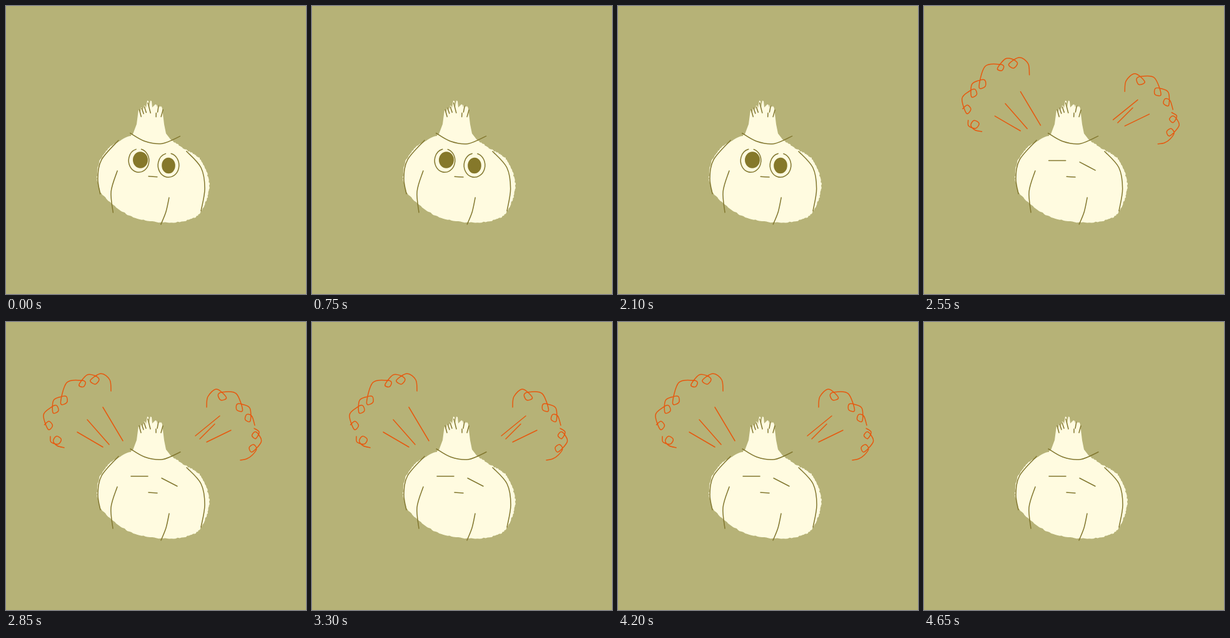
Write an HTML page with a canvas that moves like this. It is 480 px wide and 463 px high and loops after 4.8 s.

```html
<!DOCTYPE html>
<html lang="en">
<head>
<meta charset="utf-8">
<title>Garlic</title>
<style>
html, body { margin: 0; width: 100%; height: 100%; overflow: hidden; background: #b6b277; }
canvas { display: block; }
</style>
</head>
<body>
<canvas id="stage" width="480" height="463"></canvas>
<script>
const ctx = document.getElementById('stage').getContext('2d');
const STEP = 150, LOOP = 4800;
const BG = '#b6b277', SKIN = '#fffbe0', INK = '#82772f', PUPIL = '#85782a', STEAM = '#e6590f';

const bulb = [264,215, 288,231, 311,247, 325,283, 320,314, 300,341, 250,348, 195,336, 152,299, 147,259, 166,227, 203,206];
const tufts = [213,167, 217,163, 222,160, 227,152, 232,152, 240,158, 244,159, 248,161];
const folds = [
  [199,204, 222,217, 250,221, 279,209],
  [180,216, 153,247, 147,277, 151,302],
  [178,265, 168,298, 171,332],
  [289,234, 312,260, 318,294, 312,330],
  [261,308, 256,331, 248,351],
  [228,274, 242,275]
];
const fibres = [
  [213,167, 216,178], [217,164, 220,173], [221,162, 224,171], [227,156, 231,172],
  [240,172, 240,178], [244,160, 242,171], [251,167, 248,178]
];
const lids = [[200,248, 227,248], [249,251, 274,264]];
const rays = [
  [155,137, 187,191], [130,157, 165,197], [114,177, 155,201],
  [342,151, 303,183], [334,164, 310,188], [360,174, 321,193]
];

function random(seed) {
  return () => (seed = (seed * 16807) % 2147483647) / 2147483647;
}

function pairs(flat) {
  const pts = [];
  for (let i = 0; i < flat.length; i += 2) pts.push([flat[i], flat[i + 1]]);
  return pts;
}

// Looping line around a hub: each loop is [x, y, radius], dir is the way round
function curl(hub, dir, head, loops, tail) {
  const out = (x, y) => {
    const dx = x - hub[0], dy = y - hub[1], len = Math.hypot(dx, dy);
    return [dx / len, dy / len];
  };
  const pts = [...head];
  loops.forEach(([x, y, r], i) => {
    const [nx, ny] = out(x, y), a = Math.atan2(ny, nx);
    for (let k = 1; k <= 4; k++) {
      const turn = a + dir * k * Math.PI / 2;
      pts.push(x + r * Math.cos(turn), y + r * Math.sin(turn));
    }
    const next = loops[i + 1];
    if (!next) return;
    const mx = (x + next[0]) / 2, my = (y + next[1]) / 2, [ux, uy] = out(mx, my);
    const rise = 4 + 0.34 * Math.hypot(next[0] - x, next[1] - y);
    pts.push(mx + ux * rise, my + uy * rise);
  });
  return [...pts, ...tail];
}

const left = [150, 175], right = [320, 190];
const curls = [
  curl(left, -1, [168,111, 166,93, 152,83], [[142,93,7], [122,99,5.5], [92,125,7], [78,140,6.5], [68,166,6.5]], []),
  curl(left, -1, [71,184, 72,193], [[82,190,6.5]], [82,199, 93,202]),
  curl(right, 1, [321,137, 323,120, 337,108], [[346,119,7], [374,137,6.5], [388,154,6]], [398,166]),
  curl(right, 1, [397,171, 405,177], [[399,182,5.5], [395,203,6]], [394,214, 385,220, 375,222])
];

// Catmull-Rom curve as bezier segments
function curve(path, pts) {
  path.moveTo(...pts[0]);
  for (let i = 0; i < pts.length - 1; i++) {
    const b = pts[i], c = pts[i + 1], a = pts[i - 1] || b, d = pts[i + 2] || c;
    path.bezierCurveTo(b[0] + (c[0] - a[0]) / 6, b[1] + (c[1] - a[1]) / 6,
      c[0] - (d[0] - b[0]) / 6, c[1] - (d[1] - b[1]) / 6, c[0], c[1]);
  }
}

// Smooth bulb with a dry-brush edge, joined to the frayed stalk
function makeBody() {
  const path = new Path2D(), rnd = random(77), pts = pairs(bulb);
  path.moveTo(203, 206);
  path.lineTo(209, 190);
  for (const [x, y] of pairs(tufts)) {
    path.lineTo(x - 1, y);
    path.lineTo(x + 1, y + 1);
    path.lineTo(x + 2, Math.max(y + 4, 163));
  }
  path.lineTo(253, 190);
  path.lineTo(256, 205);
  const mix = (a, b, c, d, t) => 0.5 * (2 * b + (c - a) * t +
    (2 * a - 5 * b + 4 * c - d) * t * t + (3 * b - a - 3 * c + d) * t * t * t);
  for (let i = 0; i < pts.length - 1; i++) {
    const b = pts[i], c = pts[i + 1], a = pts[i - 1] || b, d = pts[i + 2] || c;
    for (let t = 0; t < 1; t += 0.06) {
      path.lineTo(mix(a[0], b[0], c[0], d[0], t) + (rnd() - 0.5) * 1.7,
        mix(a[1], b[1], c[1], d[1], t) + (rnd() - 0.5) * 1.7);
    }
  }
  path.closePath();
  return path;
}

function sketch(lines, phase, shake) {
  const path = new Path2D(), rnd = random(311 + phase * 977);
  const jog = size => (rnd() - 0.5) * size;
  for (const line of lines) {
    const dx = jog(shake), dy = jog(shake);
    curve(path, pairs(line).map(([x, y]) => [x + dx + jog(shake / 2), y + dy + jog(shake / 2)]));
  }
  return path;
}

const body = makeBody();
const poses = [0, 1, 2].map(phase => {
  const shake = phase === 1 ? 0 : 0.8;
  return {
    lines: sketch([...folds, ...fibres], phase, shake),
    lids: sketch(lids, phase, shake),
    steam: sketch([...rays, ...curls], phase, shake * 1.5)
  };
});

function stroke(path, color) {
  ctx.strokeStyle = color;
  ctx.lineWidth = 1.5;
  ctx.stroke(path);
}

function eye(x, y, rx, ry, px, py, prx, pry, phase) {
  const ring = new Path2D(), pupil = new Path2D(), tilt = (phase - 1) * 0.02;
  ring.ellipse(x, y, rx, ry, tilt, -1.3, Math.PI * 1.5 - 0.25);
  pupil.ellipse(px, py, prx, pry, tilt, 0, Math.PI * 2);
  stroke(ring, INK);
  ctx.fillStyle = PUPIL;
  ctx.fill(pupil);
}

const within = (t, from, to) => t >= from && t < to;

function draw(time) {
  const t = Math.floor((time % LOOP) / STEP) * STEP;
  const phase = (t / STEP) % 3, pose = poses[phase];
  const closed = within(t, 1200, 1500) || t >= 2250;

  ctx.fillStyle = BG;
  ctx.fillRect(0, 0, 480, 463);
  ctx.lineCap = ctx.lineJoin = 'round';
  ctx.fillStyle = SKIN;
  ctx.fill(body);
  stroke(pose.lines, INK);
  if (closed) {
    stroke(pose.lids, INK);
  } else {
    eye(212.5, 248.5, 16.3, 18.8, 215, 247.5, 12, 13.3, phase);
    eye(260, 256, 16.8, 19.3, 260, 256.5, 10.8, 12.8, phase);
  }
  if (within(t, 2550, 4350)) stroke(pose.steam, STEAM);
}

const start = performance.now();
function tick() {
  draw(Math.max(0, performance.now() - start));
  requestAnimationFrame(tick);
}
tick();
</script>
</body>
</html>
```
